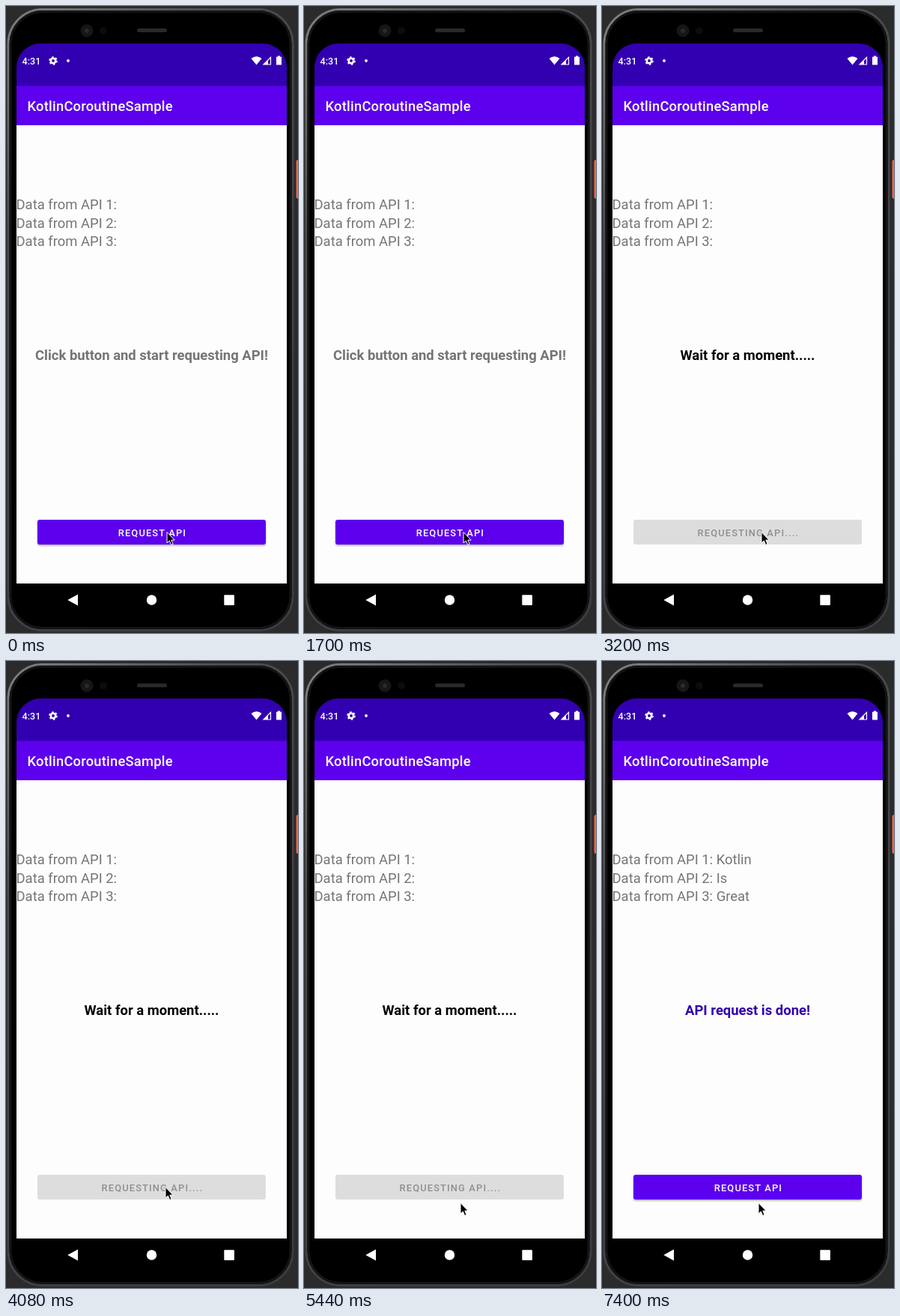
Write an HTML page that moves like this. It is 390x836 px and loops after 7500 ms.

```html
<!DOCTYPE html>
<html lang="en">
<head>
<meta charset="utf-8">
<style>
  html, body { margin: 0; width: 100%; height: 100%; overflow: hidden; background: #2b2b2b; }
  svg { display: block; width: 390px; height: 836px; }
  text { font-family: Roboto, sans-serif; font-size: 18.45px; }
  .mid { text-anchor: middle; }
  .data { fill: #757575; }
  .title { font-size: 18.37px; font-weight: 500; letter-spacing: .0125em; }
  .clock { font-size: 12.6px; font-weight: 500; }
  #message { font-weight: 700; }
  #label { font-size: 12.86px; font-weight: 500; letter-spacing: .0893em; }
</style>
</head>
<body>
<svg viewBox="0 0 390 836">
  <defs>
    <clipPath id="screen"><path d="M14 770V82A32 32 0 0 1 46 50H343A32 32 0 0 1 375 82V770Z"/></clipPath>
    <linearGradient id="rim" x2=".5" y2="1">
      <stop offset="0" stop-color="#808080"/>
      <stop offset=".3" stop-color="#4c4c4e"/>
      <stop offset="1" stop-color="#3c3c42"/>
    </linearGradient>
    <filter id="shadow" x="-5%" y="-20%" width="110%" height="160%">
      <feDropShadow dx="0" dy="1.5" stdDeviation="1" flood-color="#000" flood-opacity=".35"/>
    </filter>
  </defs>

  <!-- phone body -->
  <rect x="3" y="4.500" width="380" height="828" rx="46" fill="#000" stroke="url(#rim)" stroke-width="3"/>
  <rect x="6" y="7.500" width="374" height="822" rx="43" fill="none" stroke="#141416" stroke-width="3"/>
  <circle cx="108" cy="33" r="8.500" fill="#161616"/>
  <circle cx="108" cy="33" r="3" fill="#2a2a2a"/>
  <circle cx="130" cy="33" r="5" fill="#0c0c0c"/>
  <rect x="175" y="30" width="40" height="5" rx="2.500" fill="#292929"/>
  <rect x="387.500" y="205" width="8" height="52" rx="3" fill="#ee6644"/>

  <!-- screen -->
  <g clip-path="url(#screen)">
    <path fill="#fdfdfd" d="M14 158h361v612H14z"/>
    <path fill="#3200b0" d="M14 50h361v57H14z"/>
    <path fill="#5c00ee" d="M14 106.500h361V159H14z"/>
  </g>
  <g fill="#fff">
    <text class="clock" x="21.500" y="77.500">4:31</text>
    <circle cx="63" cy="73" r="3.200" fill="none" stroke="#fff" stroke-width="2.600"/>
    <circle cx="63" cy="73" r="4.900" fill="none" stroke="#fff" stroke-width="1.800" stroke-dasharray="2.500 2.630"/>
    <circle cx="83" cy="73" r="1.900"/>
    <path d="M327.500 70Q334.500 64.500 341.500 70L334.500 78.500Z"/>
    <path d="M353.500 68.500V78H344Z" fill="none" stroke="#fff" stroke-width="1.200"/>
    <path d="M350 72V78H344Z"/>
    <path d="M363 66.500h3v1.300h2V78.500h-7V67.800h2z"/>
    <text class="title" x="28.500" y="140">KotlinCoroutineSample</text>
    <path d="M82.300 792L96 784.500V799.500Z"/>
    <circle cx="194.500" cy="792" r="6.700"/>
    <rect x="291.300" y="785.300" width="13.600" height="13.600" rx="1"/>
  </g>
  <text class="data" x="13.500" y="271"></text>
  <text class="data" x="13.500" y="295.700"></text>
  <text class="data" x="13.500" y="320.300"></text>
  <text id="message" class="mid" x="194.500" y="472"></text>
  <rect id="button" x="42" y="685" width="305" height="33" rx="3"/>
  <text id="label" class="mid" x="195.400" y="706.500"></text>

  <path id="cursor" d="M0 0V14.500L3.300 11.500 5.700 17 8.100 16 5.800 10.600H10.200Z"
        fill="#000" stroke="#fff" stroke-width="1" stroke-linejoin="round"/>
</svg>
<script>
  const LOOP = 7500, REQUEST = 2200, DONE = 5800;
  const words = ["Kotlin", "Is", "Great"];
  const rows = document.querySelectorAll(".data");
  const [message, button, label, cursor] =
    ["message", "button", "label", "cursor"].map(id => document.getElementById(id));

  const states = {
    idle: { text: "Click button and start requesting API!", color: "#757575" },
    busy: { text: "Wait for a moment.....", color: "#000" },
    done: { text: "API request is done!", color: "#3200b0" }
  };

  const ramp = (t, from, to) => {
    const p = Math.min(1, Math.max(0, (t - from) / (to - from)));
    return p * p * (3 - 2 * p);
  };
  const gray = v => `rgb(${v},${v},${v})`;

  let shown;
  function show(name) {
    if (name === shown) return;
    shown = name;
    const busy = name === "busy";
    message.textContent = states[name].text;
    message.setAttribute("fill", states[name].color);
    label.textContent = busy ? "REQUESTING API...." : "REQUEST API";
    label.setAttribute("fill", busy ? "#8f8f8f" : "#fff");
    button.setAttribute("filter", busy ? "none" : "url(#shadow)");
    rows.forEach((row, i) => {
      row.textContent = `Data from API ${i + 1}:` + (name === "done" ? " " + words[i] : "");
    });
  }

  function draw() {
    const t = performance.now() % LOOP;
    show(t < REQUEST ? "idle" : t < DONE ? "busy" : "done");
    button.setAttribute("fill", shown === "busy"
      ? gray(Math.round(229 - 8 * ramp(t, 2380, 2700)))
      : "#5c00ee");
    const nudge = ramp(t, 500, 800), leave = ramp(t, 4700, 5000);
    cursor.setAttribute("transform",
      `translate(${215 - 2 * nudge - 4 * leave} ${701.5 + 21 * leave})`);
    requestAnimationFrame(draw);
  }
  draw();
</script>
</body>
</html>
```
